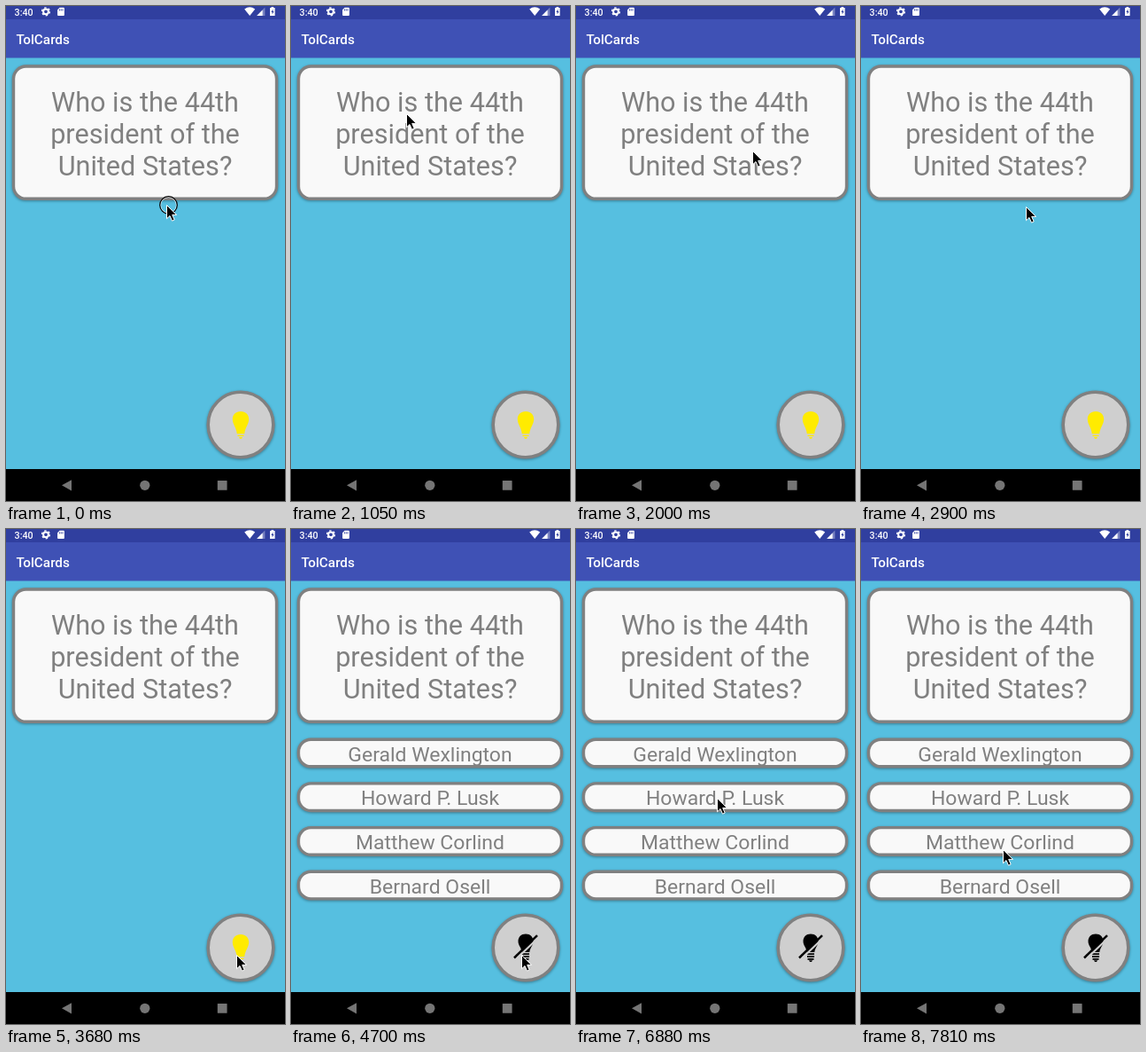
These frames come from a looping animation (315x558 px, 8 s). An HTML page:

```html
<!DOCTYPE html>
<html lang="en">
<head>
<meta charset="utf-8">
<title>Flash cards</title>
<style>
  html, body { margin: 0; width: 100%; height: 100%; overflow: hidden; background: #56bfe0; }
  svg { display: block; width: 100vw; height: 100vh; }
  text { font-family: Roboto, sans-serif; }
  .bar { fill: #fff; font-weight: 500; }
  .card { fill: #f9f9f9; stroke: #808080; stroke-width: 3.4; }
  .raised { filter: drop-shadow(0 1.5px 1.5px rgba(0, 0, 0, .35)); }
  .copy { fill: #808080; text-anchor: middle; }
  .question { font-size: 30.63px; }
  .answer { font-size: 22.97px; }
</style>
</head>
<body>
<svg viewBox="0 0 315 558" xmlns="http://www.w3.org/2000/svg">
  <rect width="315" height="558" fill="#56bfe0"/>
  <rect width="315" height="58.5" fill="#3f51b5"/>
  <rect width="315" height="15" fill="#303f9f"/>

  <!-- status bar -->
  <text class="bar" x="9.6" y="10.6" font-size="10.7">3:40</text>
  <g fill="none" stroke="#fff">
    <circle cx="45" cy="6.3" r="2.9" stroke-width="2"/>
    <circle cx="45" cy="6.3" r="4.4" stroke-width="1.4" stroke-dasharray="2.3 2.31"/>
  </g>
  <path d="M60.6 1.8H65a.9.9 0 0 1 .9.9V10a.9.9 0 0 1-.9.9H59a.9.9 0 0 1-.9-.9V4.3Z" fill="#fff"/>
  <path d="M60.4 3.4v2M62.2 3.4v2M64 3.4v2" stroke="#303f9f" stroke-width=".9"/>
  <path d="M269.2 3.4Q275.2-.9 281.2 3.4L275.2 10.9Z" fill="#fff"/>
  <path d="M283.2 10.9H292.4V1.6Z" fill="#fff" opacity=".35"/>
  <path d="M283.2 10.9H289.6V4.4Z" fill="#fff"/>
  <path d="M299.5 1h2.6v1.1h1.5V11h-5.6V2.1h1.5Z" fill="#fff"/>
  <path d="M301.4 3.6L299.4 7H300.6V9.6L302.5 6.1H301.4Z" fill="#303f9f"/>

  <text class="bar" x="11.5" y="42.8" font-size="15.3">TolCards</text>

  <!-- question -->
  <rect class="card raised" x="8.5" y="68" width="297" height="149.3" rx="14"/>
  <g class="copy question">
    <text x="157" y="119">Who is the 44th</text>
    <text x="157" y="155">president of the</text>
    <text x="157" y="191">United States?</text>
  </g>

  <g id="answers"></g>

  <!-- hint button -->
  <circle class="raised" cx="265" cy="472" r="36.8" fill="#cfcfcf" stroke="#808080" stroke-width="3.6"/>
  <g id="lit" fill="#ffeb00">
    <path d="M265 457C270.600 457 274.200 460.800 274.200 465.800C274.200 471.500 269.900 475 269.200 482.300H260.800C260.100 475 255.800 471.500 255.800 465.800C255.800 460.800 259.400 457 265 457Z"/>
    <path d="M261.500 483.700H268.500V485H261.500ZM263 486H267L266 487.800H264Z"/>
  </g>
  <g id="unlit">
    <path d="M265 456.500C270.200 456.500 273.500 460 273.500 464.700C273.500 469.500 269.800 472 269.300 477H260.700C260.200 472 256.500 469.500 256.500 464.700C256.500 460 259.800 456.500 265 456.500Z"/>
    <path d="M261 479.200H269M261 482H269M261.500 484.800H268.500" stroke="#000" stroke-width="1.800"/>
    <path d="M263 486.200H267L266 488H264Z"/>
    <path d="M253.500 485.500L280 460" stroke="#cfcfcf" stroke-width="2.200"/>
    <path d="M252 483.500L278 458.200" stroke="#000" stroke-width="2.500"/>
  </g>

  <!-- navigation bar -->
  <rect y="522" width="315" height="36"/>
  <g fill="#757575">
    <path d="M63 540.300L74 534.200V546.400Z"/>
    <circle cx="156.800" cy="540.300" r="5.600"/>
    <rect x="238.800" y="535" width="10.800" height="10.800" rx=".6"/>
  </g>

  <g id="pointer">
    <g id="ring" fill="none">
      <circle cx="2.500" cy=".5" r="8.900" stroke="#fff" stroke-width=".8"/>
      <circle cx="2.500" cy=".5" r="9.800" stroke="#000" stroke-width="1.200"/>
    </g>
    <path d="M.5.500V15.800L4 12.500L6.500 18.200L9.200 17L6.700 11.400H11.600Z" stroke="#fff" stroke-width="1"/>
  </g>
</svg>
<script>
const LOOP = 8000;
const REVEAL = 4700;
const CLICKS = [[0, 30], [4430, 4640]];
const NAMES = ["Gerald Wexlington", "Howard P. Lusk", "Matthew Corlind", "Bernard Osell"];

// Pointer path: time, x, y
const PATH = [
  [0, 181, 224], [330, 181, 224], [780, 76, 124], [1050, 130, 121],
  [1140, 154, 121], [1400, 221, 123], [1700, 114, 160], [2000, 199, 163],
  [2210, 127, 200], [2450, 181, 207], [2810, 181, 207], [3380, 256, 489],
  [3590, 256, 489], [3680, 260, 480], [5750, 260, 480], [6130, 176, 257],
  [6270, 156, 245], [6600, 156, 245], [6940, 159, 308], [7510, 159, 308],
  [7810, 160, 361], [LOOP, 160, 361]
];

const $ = id => document.getElementById(id);
const answers = $("answers"), lit = $("lit"), unlit = $("unlit");
const pointer = $("pointer"), ring = $("ring");

answers.innerHTML = NAMES.map((name, i) => `
  <g transform="translate(0 ${i * 49.7})">
    <rect class="card raised" x="8.5" y="237.200" width="297" height="30.600" rx="14"/>
    <text class="copy answer" x="157" y="261.500">${name}</text>
  </g>`).join("");

const show = (el, on) => el.setAttribute("visibility", on ? "visible" : "hidden");

function slope(i, axis) {
  const a = PATH[i - 1], b = PATH[i], c = PATH[i + 1];
  if (!a || !c) return 0;
  const before = (b[axis] - a[axis]) / (b[0] - a[0]);
  const after = (c[axis] - b[axis]) / (c[0] - b[0]);
  return before * after > 0 ? 2 * before * after / (before + after) : 0;
}

// Monotone cubic: eases through turns without overshooting
function along(t, axis) {
  let i = 0;
  while (i < PATH.length - 2 && t >= PATH[i + 1][0]) i++;
  const a = PATH[i], b = PATH[i + 1];
  const span = b[0] - a[0], u = (t - a[0]) / span;
  const s = u * u * (3 - 2 * u);
  return a[axis] + (b[axis] - a[axis]) * s
    + span * u * (1 - u) * ((1 - u) * slope(i, axis) - u * slope(i + 1, axis));
}

function draw(t) {
  const open = t >= REVEAL;
  show(answers, open);
  show(unlit, open);
  show(lit, !open);
  show(ring, CLICKS.some(([from, to]) => t >= from && t < to));
  pointer.setAttribute("transform",
    `translate(${Math.round(along(t, 1))} ${Math.round(along(t, 2))})`);
}

let start;
function tick(now) {
  start ??= now;
  draw((now - start) % LOOP);
  requestAnimationFrame(tick);
}
draw(0);
requestAnimationFrame(tick);
</script>
</body>
</html>
```
